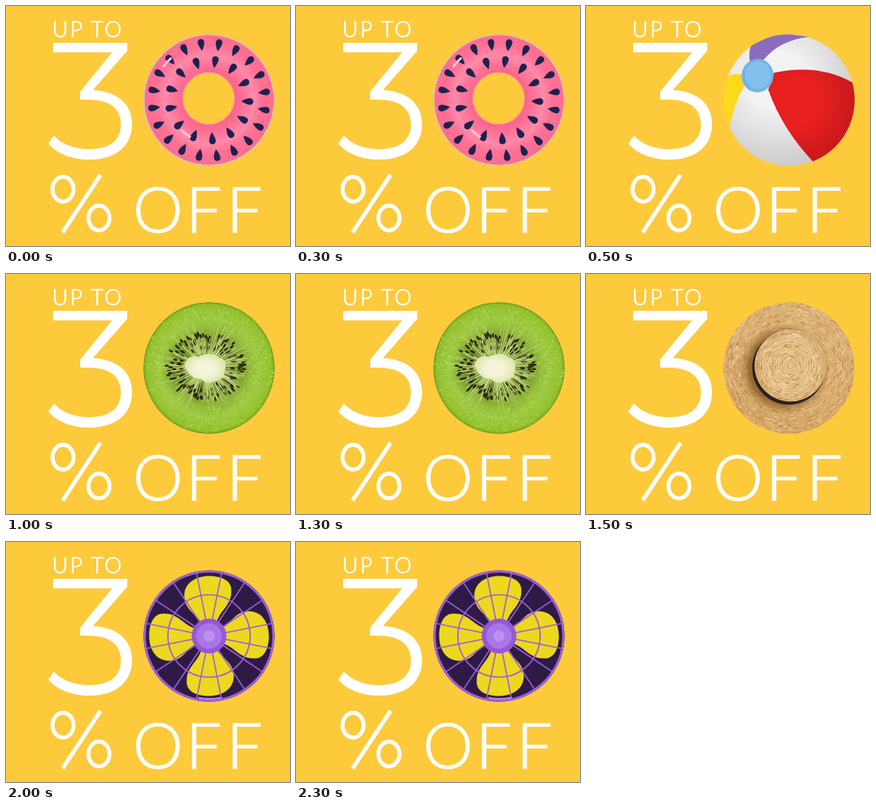
Recreate the animation shown at these times as an HTML page. Size 356 by 300 pixels, loop 2500 ms.

```html
<!DOCTYPE html>
<html lang="en">
<head>
<meta charset="utf-8">
<title>Up to 30% off</title>
<style>
  html, body { margin: 0; width: 100%; height: 100%; overflow: hidden; background: #fdca3c; }
  svg { display: block; width: 356px; height: 300px; }
  text { font-family: Lato, Inter, sans-serif; font-weight: 300; fill: #fff; stroke: #fff; }
</style>
</head>
<body>
<svg viewBox="0 0 356 300">
  <defs>
    <clipPath id="round"><circle r="82.3"/></clipPath>
    <radialGradient id="tube" gradientUnits="userSpaceOnUse" cx="0" cy="-1" r="82">
      <stop offset=".39" stop-color="#f9638a"/><stop offset=".5" stop-color="#ff6f94"/>
      <stop offset=".68" stop-color="#ff8aa9"/><stop offset=".82" stop-color="#ff7095"/>
      <stop offset="1" stop-color="#fb6c8d"/>
    </radialGradient>
    <radialGradient id="white" cx=".4" cy=".35" r=".7">
      <stop offset=".3" stop-color="#f3f3f3"/><stop offset="1" stop-color="#c9c8c8"/>
    </radialGradient>
    <radialGradient id="red" cx=".3" cy=".35" r=".85">
      <stop offset=".3" stop-color="#e8201f"/><stop offset="1" stop-color="#b9141a"/>
    </radialGradient>
    <radialGradient id="flesh">
      <stop offset=".25" stop-color="#c3da7a"/><stop offset=".55" stop-color="#8fb638"/>
      <stop offset=".75" stop-color="#a0cb43"/><stop offset=".95" stop-color="#94c22f"/>
      <stop offset="1" stop-color="#78a51f"/>
    </radialGradient>
    <radialGradient id="pith">
      <stop offset=".6" stop-color="#55701d" stop-opacity=".75"/>
      <stop offset="1" stop-color="#6f9426" stop-opacity="0"/>
    </radialGradient>
    <radialGradient id="core">
      <stop offset=".5" stop-color="#f3f4d8"/><stop offset="1" stop-color="#dde6ac"/>
    </radialGradient>
    <linearGradient id="straw" x1=".7" y1="0" x2=".3" y2="1">
      <stop offset="0" stop-color="#dcb57a"/><stop offset="1" stop-color="#d3a564"/>
    </linearGradient>
    <radialGradient id="shade">
      <stop offset=".75" stop-color="#7a4a18" stop-opacity=".7"/>
      <stop offset="1" stop-color="#8a5820" stop-opacity="0"/>
    </radialGradient>
    <radialGradient id="crown">
      <stop offset="0" stop-color="#e6c48c"/><stop offset=".7" stop-color="#e7c793"/>
      <stop offset="1" stop-color="#d8b077"/>
    </radialGradient>
  </defs>

  <text x="58" y="39" font-size="27" letter-spacing="2.5" stroke-width=".7">UP TO</text>
  <path fill="#fff" d="M59 46H152V56L109 105C142 107 158 124 158 148C158 173 140 192 104 192C82 192 63 184 53 172L60 162C69 172 85 179 104 179C130 179 144 168 144 148C144 128 130 117 103 117H93V107L133 58H59Z"/>
  <g fill="none" stroke="#fff" stroke-width="5">
    <ellipse cx="71.500" cy="229" rx="13.200" ry="15.500"/>
    <ellipse cx="116.500" cy="265" rx="13.200" ry="15.500"/>
    <path d="M71 283L118.500 211"/>
  </g>
  <text x="159 225.500 276.500" y="283" font-size="79.500" stroke-width="1.200">OFF</text>

  <g id="stage" transform="translate(254.500 117.500)"></g>
</svg>
<script>
const TAU = 2 * Math.PI, HOLD = 500;

let seed = 7;
const random = () => (seed = seed * 16807 % 2147483647) / 2147483647;
const between = (a, b) => a + (b - a) * random();
const repeat = (n, draw) => Array.from({ length: n }, (_, i) => draw(i)).join('');
const disc = (r, fill, x = 0, y = 0) => `<circle cx="${x}" cy="${y}" r="${r}" fill="${fill}"/>`;
const ring = (r, color, width) =>
  `<circle r="${r}" fill="none" stroke="${color}" stroke-width="${width}"/>`;
const shape = (d, fill) => `<path d="${d}" fill="${fill}"/>`;
const line = (d, color, width) =>
  `<path d="${d}" fill="none" stroke="${color}" stroke-width="${width}" stroke-linecap="round"/>`;

function swimRing() {
  const pip = (angle, r) =>
    `<path transform="rotate(${angle}) translate(0 ${-r})" fill="#1d2150" d="M0 8C-3 3-4.500-1-4-4C-3-8 3-8 4-4C4.500-1 3 3 0 8Z"/>`;
  return disc(82.3, 'url(#tube)') +
    repeat(20, i => pip(i * 18 + 10, 70)) +
    repeat(13, i => pip(i * 360 / 13 + 9, 48.5)) +
    line('M-57-42A70 70 0 0 1-48-52M-34 38A52 52 0 0 0-24 46', '#ffc3d2', 3) +
    disc(32.5, '#fdca3c', -.5, -2) +
    `<g transform="translate(-.5 -2)">${ring(32.5, '#f98fa0', 1.2)}</g>` +
    ring(81.6, '#cfcfc6', 1.4);
}

function beachBall() {
  return disc(82.3, 'url(#white)') +
    shape('M-49-47Q-51-57-48-68L-15-84L26-79Q-12-75-32-50Z', '#8b6bbd') +
    shape('M-57-32Q-70-34-78-29L-86 0L-75 36Q-68 2-56-18Z', '#fbd91d') +
    shape('M-19-34Q38-46 81-21L90 0V70L31 78Q-9 36-26-13Z', 'url(#red)') +
    `<ellipse cx="-39.500" cy="-30.500" rx="20" ry="21" transform="rotate(12 -39.500 -30.500)" fill="#74b5e6"/>` +
    `<ellipse cx="-39" cy="-31" rx="16" ry="17" fill="#83c0ec"/>`;
}

function kiwi() {
  const ray = (from, to, color, width) => {
    const a = between(0, TAU), x = Math.cos(a), y = Math.sin(a);
    return line(`M${x * from - 4} ${y * from * .8 - 1}L${x * to - 4} ${y * to * .9 - 1}`, color, width);
  };
  const pip = () => {
    const a = between(0, TAU), k = random();
    const x = Math.cos(a) * (30 + 20 * k), y = Math.sin(a) * (23 + 20 * k);
    const turn = Math.atan2(y, x) * 360 / TAU;
    return `<ellipse rx="2.800" ry="1.300" fill="#2c2a10" transform="translate(${x - 4} ${y - 1}) rotate(${turn})"/>`;
  };
  const fleck = color => {
    const a = between(0, TAU), r = between(50, 81), end = r + between(1, 3);
    const x = Math.cos(a), y = Math.sin(a);
    return line(`M${x * r} ${y * r}L${x * end} ${y * end}`, color, .8);
  };
  return disc(82.3, 'url(#flesh)') +
    repeat(500, i => fleck(i % 2 ? '#bfdf74' : '#86b12d')) +
    `<ellipse cx="-4" cy="-1" rx="58" ry="50" fill="url(#pith)"/>` +
    repeat(90, () => ray(22, between(44, 64), '#bcd36c', .8)) +
    repeat(150, pip) +
    repeat(70, () => ray(16, between(30, 50), '#d3e290', .9)) +
    shape('M-31-4Q-26-18-13-14Q2-22 13-13Q23-10 20 2Q20 13 9 16Q-2 22-10 14Q-25 14-31-4Z', 'url(#core)') +
    ring(81.8, '#6f9a22', 1);
}

function strawHat() {
  // Short arcs scattered around the centre, evenly over the area between two radii.
  const weave = (count, inner, outer, colors) => repeat(count, i => {
    const r = Math.sqrt(between(inner ** 2, outer ** 2)), a = between(0, TAU), b = a + between(2, 5) / r;
    const point = t => `${r * Math.cos(t)} ${r * Math.sin(t)}`;
    return line(`M${point(a)}A${r} ${r} 0 0 1 ${point(b)}`, colors[i % colors.length], .9);
  });
  return disc(82.3, 'url(#straw)') +
    weave(1100, 46, 82, ['#b98043', '#f1d6a6', '#c58f4e', '#e9c78e']) +
    disc(57, 'url(#shade)', -6, 1) +
    disc(46, '#2a2020', -.2, -.3) +
    disc(45, 'url(#crown)', 1.8, -3) +
    `<g transform="translate(1.800 -3)">
      ${repeat(13, i => ring(4 + i * 3.2, i % 2 ? '#d0a062' : '#c8965a', .7))}
      ${weave(350, 2, 44, ['#c08a4a', '#f6e0b5'])}
    </g>`;
}

function fan() {
  const purple = '#9c5fd9';
  const blade = 'M-10-16C-14-27-31-32-31-50C-31-66-17-75 0-75C16-75 29-69 28-56C28-38 14-33 9-16Z';
  return disc(82.3, '#2d1b46') +
    repeat(4, i => `<path transform="rotate(${i * 90})" d="${blade}" fill="#ecd81f"/>`) +
    repeat(16, i =>
      `<path transform="rotate(${(i + .5) * 22.5})" d="M0-18V-82" stroke="${purple}" stroke-width="1.600"/>`) +
    ring(51.5, purple, 1.7) +
    shape('M-14 76Q0 79 16 76L13 82H-11Z', '#bd8ce8') +
    ring(80.8, purple, 3) +
    disc(21.8, '#9658d6') + disc(16, '#aa77e6') + disc(7, '#bd90f0');
}

const stage = document.getElementById('stage');
stage.innerHTML = [swimRing, beachBall, kiwi, strawHat, fan]
  .map(draw => `<g clip-path="url(#round)">${draw()}</g>`).join('');
const items = [...stage.children];

function tick() {
  const current = Math.floor(performance.now() / HOLD) % items.length;
  items.forEach((item, i) => item.style.display = i === current ? '' : 'none');
  requestAnimationFrame(tick);
}
tick();
</script>
</body>
</html>
```
